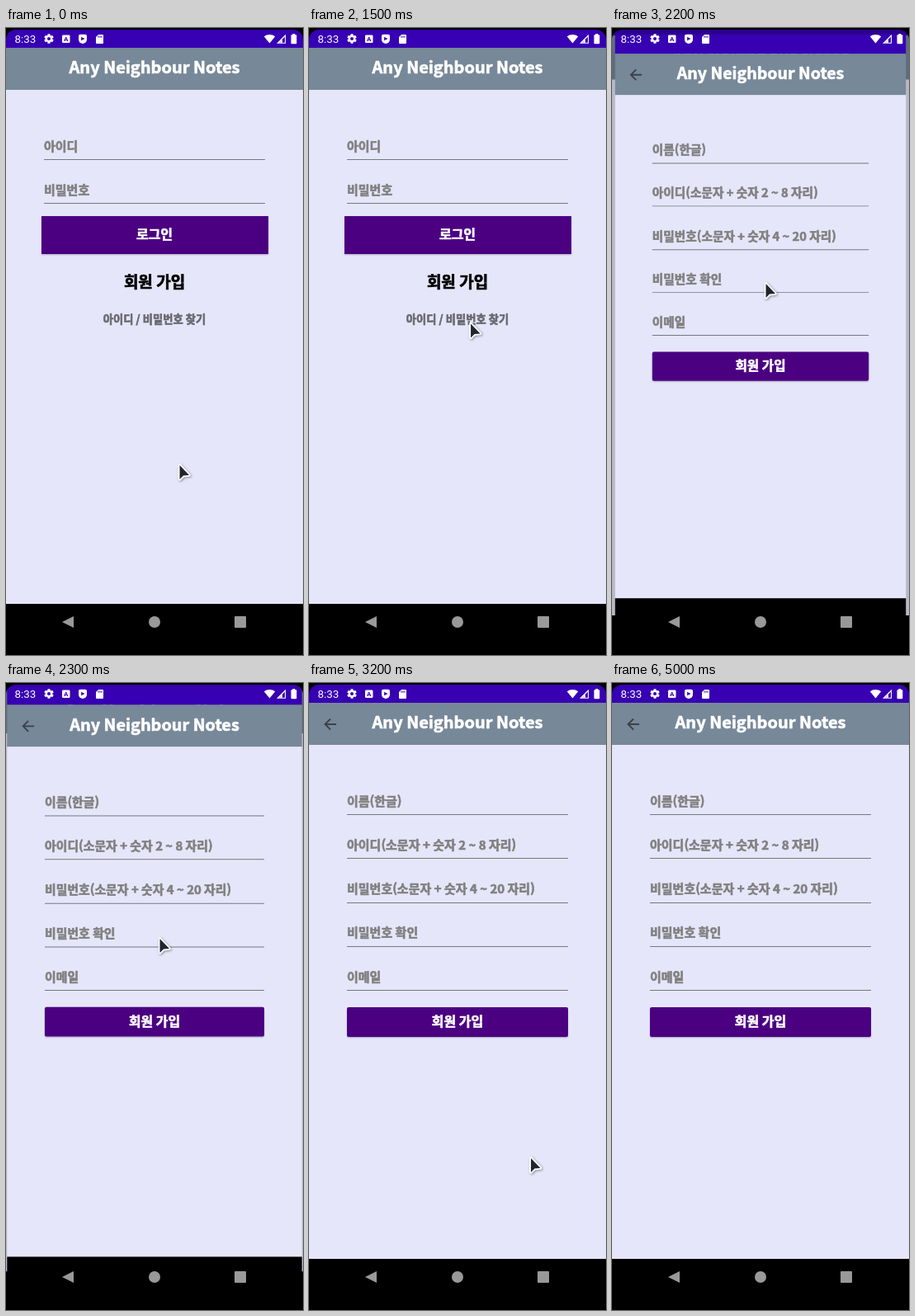
These frames come from a looping animation (360 px wide and 760 px high, 5800 ms). An HTML page with a canvas:

```html
<!DOCTYPE html>
<html lang="ko">
<head>
<meta charset="utf-8">
<title>Sign up</title>
<style>
html, body { margin: 0; width: 100%; height: 100%; overflow: hidden; background: #000; }
canvas { display: block; width: 100vw; height: 100vh; }
</style>
</head>
<body>
<canvas id="stage" width="360" height="760"></canvas>
<script>
const ctx = document.getElementById('stage').getContext('2d');
const W = 360, H = 760, MID = W / 2, PIVOT = 373;
const LOOP = 5800, TICK = 100, OPEN = 2200, POINTER_END = 5000;
const WHITE = '#fff', BLACK = '#000', PURPLE = '#3700b3', SLATE = '#778899',
  LAVENDER = '#e6e6fa', INDIGO = '#4b0082', GREY = '#808080';
const SANS = '"Noto Sans CJK KR", "Noto Sans CJK", "Noto Sans", sans-serif';

// Pointer strokes: each eases to a point, with an optional sideways bow
const REST = { x: 210.5, y: 530 };
const MOVES = [
  { from: 500, to: 1100, x: 223.5, y: 497 },
  { from: 1100, to: 1700, x: 186.5, y: 310 },
  { from: 2500, to: 2700, x: 192.5, y: 314 },
  { from: 2700, to: 3200, x: 269, y: 576, bowX: 100 },
  { from: 4000, to: 4400, x: 262.5, y: 564, bowX: -12, bowY: 12 },
  { from: 4400, to: 4900, x: 158.5, y: 556, bowY: -8 }
];

const clamp = v => Math.min(1, Math.max(0, v));
const ease = k => k * k * (3 - 2 * k);

function rect(x, y, w, h, color, r = 0) {
  ctx.fillStyle = color;
  ctx.beginPath();
  ctx.roundRect(x, y, w, h, r);
  ctx.fill();
}

function disc(x, y, r, color) {
  rect(x - r, y - r, 2 * r, 2 * r, color, r);
}

function triangle(x1, y1, x2, y2, x3, y3, color) {
  ctx.fillStyle = color;
  ctx.beginPath();
  ctx.moveTo(x1, y1);
  ctx.lineTo(x2, y2);
  ctx.lineTo(x3, y3);
  ctx.fill();
}

// right angle at x, y; legs go left and up, or right and down if s < 0
function corner(x, y, s, color) {
  triangle(x, y, x - s, y, x, y - s, color);
}

// sideways arrowhead, pointing right if r > 0
function play(x, y, r, color) {
  triangle(x + r, y, x - r, y - r, x - r, y + r, color);
}

function label(str, x, mid, size, color, align = 'center') {
  ctx.font = `900 ${size}px ${SANS}`;
  ctx.textAlign = align;
  ctx.fillStyle = ctx.strokeStyle = color;
  ctx.lineWidth = 0.65;
  ctx.lineJoin = 'round';
  ctx.fillText(str, x, mid + size * 0.37);
  ctx.strokeText(str, x, mid + size * 0.37);
}

function button(str, y, w, h, r) {
  ctx.save();
  ctx.shadowColor = 'rgba(0,0,0,.25)';
  ctx.shadowBlur = 2;
  ctx.shadowOffsetY = 1;
  rect(MID + 0.5 * (w % 2) - w / 2, y, w, h, INDIGO, r);
  ctx.restore();
  label(str, MID, y + h / 2 - 1, 16, WHITE);
}

function field(str, i) {
  const y = 143 + i * 53.3;
  label(str, 46, y, 15, GREY, 'left');
  rect(46, Math.round(y + 16), 268, 1, '#77777f');
}

function page() {
  rect(0, 0, W, 24, PURPLE);
  rect(0, 24, W, 51, SLATE);
  rect(0, 75, W, 623, LAVENDER);
  rect(0, 698, W, 62, BLACK);
  label('Any Neighbour Notes', MID, 48, 20, WHITE);
}

function loginPage() {
  page();
  ['아이디', '비밀번호'].forEach(field);
  button('로그인', 228, 275, 46, 0);
  label('회원 가입', MID, 308, 19, BLACK);
  label('아이디 / 비밀번호 찾기', MID, 353.5, 13.3, '#696970');
}

function backArrow(x, y) {
  ctx.strokeStyle = '#3a424a';
  ctx.lineWidth = 1.9;
  ctx.lineJoin = 'miter';
  ctx.beginPath();
  ctx.moveTo(x + 7, y);
  ctx.lineTo(x - 6, y);
  ctx.moveTo(x, y - 6.5);
  ctx.lineTo(x - 6.5, y);
  ctx.lineTo(x, y + 6.5);
  ctx.stroke();
}

function signupPage() {
  page();
  backArrow(26, 50);
  ['이름(한글)', '아이디(소문자 + 숫자 2 ~ 8 자리)', '비밀번호(소문자 + 숫자 4 ~ 20 자리)',
    '비밀번호 확인', '이메일'].forEach(field);
  button('회원 가입', 393, 268, 36, 2);
}

function zoomed(scale, drawPage) {
  ctx.save();
  ctx.translate(MID, PIVOT);
  ctx.scale(scale, scale);
  ctx.translate(-MID, -PIVOT);
  drawPage();
  ctx.restore();
}

function gear(x, y) {
  for (let i = 0; i < 3; i++) {
    ctx.save();
    ctx.translate(x, y);
    ctx.rotate(i * Math.PI / 3);
    rect(-1.6, -5.8, 3.2, 11.6, WHITE, 0.6);
    ctx.restore();
  }
  disc(x, y, 4.4, WHITE);
  disc(x, y, 2, PURPLE);
}

function smallText(str, x, y, font, color) {
  ctx.font = `${font} Roboto, sans-serif`;
  ctx.textAlign = 'center';
  ctx.fillStyle = color;
  ctx.fillText(str, x, y);
}

function wifi(x, y) {
  ctx.fillStyle = WHITE;
  ctx.beginPath();
  ctx.moveTo(x, y);
  ctx.arc(x, y, 10.6, -Math.PI * 0.72, -Math.PI * 0.28);
  ctx.fill();
}

function statusIcons() {
  smallText('8:33', 23.3, 18, '13.4px', WHITE);
  gear(52, 13);

  rect(68, 8.5, 9.5, 9.5, WHITE, 1.2);
  smallText('A', 72.8, 16.2, 'bold 8px', PURPLE);

  rect(88, 7.8, 10, 11.2, WHITE, [2, 2, 5, 5]);
  play(93.3, 13, 2.2, PURPLE);

  rect(109, 8, 9, 11, WHITE, 1);
  corner(109, 8, -3, PURPLE);
  for (let x = 111.5; x < 116; x += 2) rect(x, 9.5, 1, 2.3, PURPLE);

  wifi(319.5, 18.5);

  corner(339, 18.7, 11, WHITE);
  corner(338, 17.7, 7, PURPLE);
  corner(335, 17.7, 4, WHITE);

  rect(347.3, 7, 3, 2, WHITE);
  rect(345.5, 8.2, 6.8, 11, WHITE, 1);
}

function navIcons() {
  const c = '#999';
  play(75, 720, -7, c);
  disc(180, 720, 7, c);
  rect(277, 713, 14, 14, c, 1);
}

function topEdge() {
  ctx.fillStyle = BLACK;
  ctx.beginPath();
  ctx.rect(0, 0, W, 14);
  ctx.roundRect(0, 2, W, 12, [12, 12, 0, 0]);
  ctx.fill('evenodd');
}

function pointerAt(t) {
  let { x, y } = REST;
  for (const m of MOVES) {
    const k = ease(clamp((t - m.from) / (m.to - m.from)));
    const bow = Math.sin(Math.PI * k);
    x += (m.x - x) * k + (m.bowX || 0) * bow;
    y += (m.y - y) * k + (m.bowY || 0) * bow;
  }
  return [x, y];
}

function pointer(t) {
  ctx.save();
  ctx.translate(...pointerAt(t));
  ctx.beginPath();
  ctx.moveTo(0, 0);
  ctx.lineTo(0, 17);
  ctx.lineTo(4.5, 12.6);
  ctx.lineTo(11.5, 12);
  ctx.closePath();
  ctx.lineJoin = 'round';
  ctx.lineWidth = 3.6;
  ctx.strokeStyle = WHITE;
  ctx.shadowColor = 'rgba(0,0,0,.4)';
  ctx.shadowBlur = 3;
  ctx.shadowOffsetX = ctx.shadowOffsetY = 1;
  ctx.stroke();
  ctx.shadowColor = 'transparent';
  ctx.fillStyle = '#20262f';
  ctx.fill();
  ctx.restore();
}

function draw(t) {
  rect(0, 0, W, H, BLACK);
  if (t < OPEN) {
    loginPage();
  } else {
    // the new page settles while the old one grows behind it
    const left = t < OPEN + 400 ? 0.14 * Math.exp((OPEN - t) / 95) : 0;
    zoomed(1.05 - 0.05 * left, loginPage);
    rect(0, 0, W, H, 'rgba(0,0,0,.2)');
    zoomed(1 - 0.15 * left, signupPage);
  }
  topEdge();
  statusIcons();
  navIcons();
  if (t < POINTER_END) pointer(t);
}

const start = performance.now();
function frame() {
  const t = (performance.now() - start) % LOOP;
  draw(Math.floor(t / TICK) * TICK);
  requestAnimationFrame(frame);
}
frame();
</script>
</body>
</html>
```
